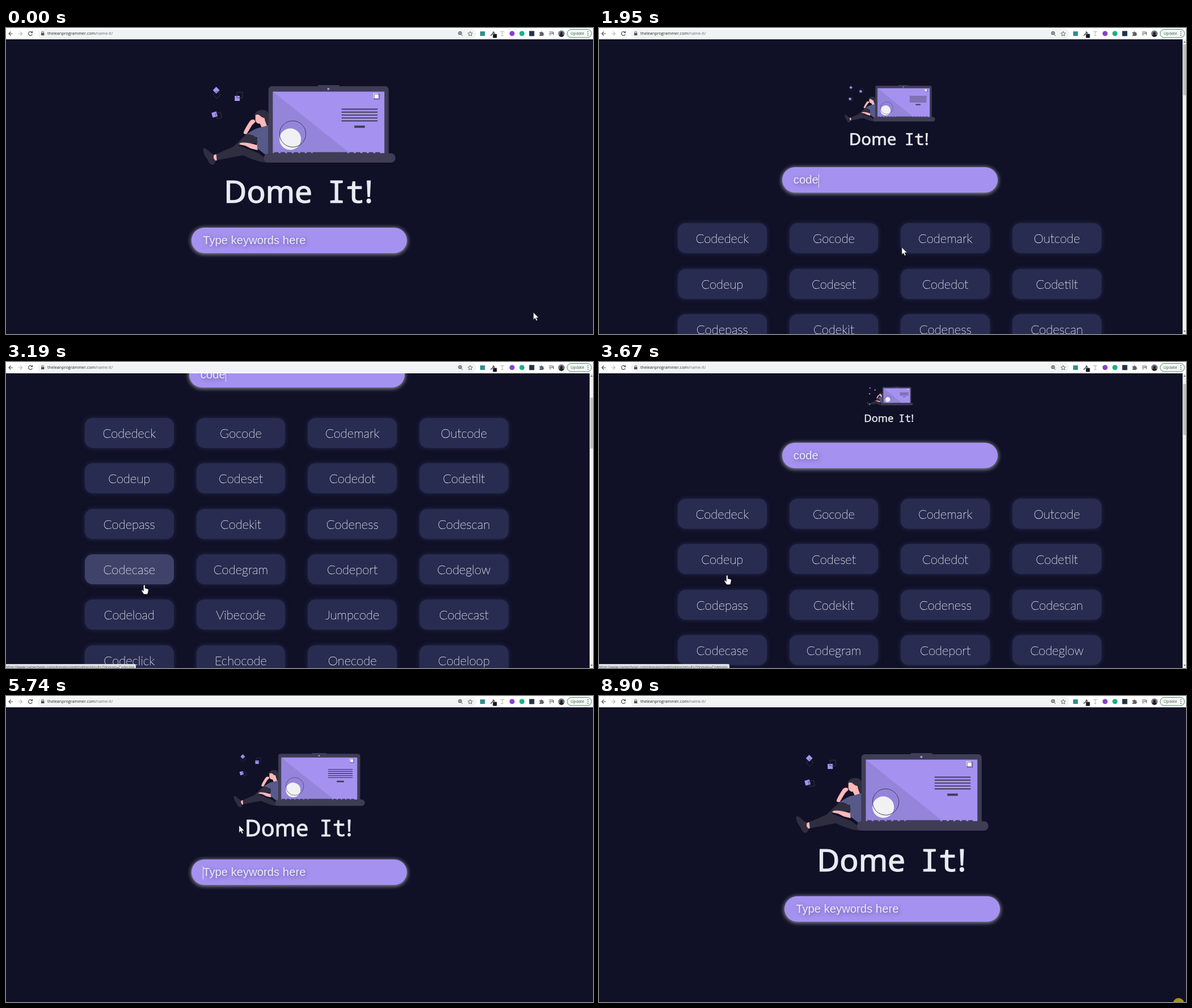
Recreate the animation shown at these times as an HTML page. Size 1035x541 px, loop 9070 ms.

```html
<!DOCTYPE html>
<html lang="en">
<head>
<meta charset="utf-8">
<title>Dome It!</title>
<style>
html, body { margin: 0; width: 100%; height: 100%; overflow: hidden; background: #101127; }
#stage { position: relative; width: 1035px; height: 541px; overflow: hidden; }
#stage > *, #page > * { position: absolute; }
#view { inset: 0; clip-path: inset(20px 0 0 0); }
#page, svg { position: absolute; left: 0; top: 0; width: 1035px; height: 541px; overflow: visible; }
#input {
  width: 360px; height: 45px; padding-left: 20px; border-radius: 23px; background: #a592f0;
  box-shadow: 0 1px 7px 1px rgba(255,255,255,.55);
  font: 20.25px/45px "Liberation Sans", Arial, sans-serif; color: #ecebf5;
  text-shadow: 2px 2px 6px rgba(40,30,90,.5); white-space: pre;
}
#input i { display: inline-block; width: 1px; height: 23px; margin-right: -1px; vertical-align: middle; background: #eee; }
#typed.sel { background: #3390ff; color: #fff; }
.card {
  width: 156.5px; border-radius: 14px; text-align: center; color: #eceef6;
  background: #282c50; box-shadow: 0 0 9px rgba(62,66,112,.5);
}
.card.thin { -webkit-text-stroke: .4px #eceef6; }
.card.hot { background: #3f4369; }
#bar { left: 1028.6px; top: 20px; width: 7px; height: 521px; background: #f1f1f1; }
#thumb { position: absolute; left: 1px; width: 5px; height: 90px; background: #c1c1c1; }
#status {
  left: 0; top: 534px; height: 9px; padding-right: 3px; background: #dee1e6; color: #4a4d52;
  border-radius: 0 2px 0 0; font: 6.2px/11px "Open Sans", sans-serif; white-space: pre; text-indent: -1px;
}
</style>
</head>
<body>
<div id="stage">
  <div id="view">
    <div id="page">
      <svg>
        <g id="art">
          <!-- floating squares -->
          <g fill="#a592f0">
            <path d="M371 104l6 6-6 6-6-6z"/>
            <path d="M403.5 120h9v9h-9z"/>
            <path d="M362.5 150l8.600-2.400 2.400 8.600-8.600 2.400z"/>
          </g>
          <path d="M372 111.500l6.500 6.500-6.500 6.500-6.500-6.500zM407.500 113.500h10v10h-10zM369.500 151.500l9-2.500 2.500 9-9 2.500z" fill="none" stroke="#3f3d56" stroke-width=".8"/>
          <!-- person -->
          <path d="M438 153q6-10 17-8 6 1 8 6v24h-6l-4-14z" fill="#2f2e41"/>
          <path d="M440 154q4-2 7 0 5 5 9 5l1 5 4 11-9 3-4-9q-6 1-8-6z" fill="#ffb8b8"/>
          <path d="M463 172l-15 4q-6 1-11 4l-13 8 2 4 17 1-1 19 21 16z" fill="#575a89"/>
          <path d="M419 185q3-8 11-20 4-5 9-2l1 3-6 6-9 15q-5 2-6-2z" fill="#ffb8b8"/>
          <path d="M371 223l30-13 23-22q9-2 19 7l1 9-31 0-2 4 34 13 19 14-5 3q-15-1-41-13l-47 9z" fill="#2f2e41"/>
          <path d="M412 204q6-4 31 3l1 9-12-3-10-5-10-2z" fill="#ffb8b8"/>
          <path d="M371 223l1 11-4 1-3-10z" fill="#ffb8b8"/>
          <path d="M348 213q3-2 8 3 5 5 11 8l-1 6 4 5q-1 5-5 7-6 0-9-9-9-11-8-20z" fill="#2f2e41"/>
          <!-- laptop -->
          <g fill="#3f3d56">
            <rect x="550" y="101" width="38" height="6" rx="1"/>
            <rect x="463" y="103" width="212" height="130" rx="6"/>
          </g>
          <circle cx="568.700" cy="107.700" r="2" fill="#a592f0"/>
          <path d="M471 112.500h196.500v109H471z" fill="#a592f0"/>
          <path d="M471 112.500l136 109H471z" fill="#9485db"/>
          <circle cx="501.500" cy="196.500" r="19" fill="#f1f1f3"/>
          <circle cx="505.800" cy="187.300" r="23.200" fill="none" stroke="#3f3d56"/>
          <path d="M648 115.500h8.500v8.500H648z" fill="#fff"/>
          <path d="M649.500 117h9.500v9h-9.500z" fill="none" stroke="#3f3d56" stroke-width=".8"/>
          <path d="M592 143.500h63.500m-63.500 5.200h63.500m-63.500 5.200h63.500m-63.500 5.200h63.500m-63.500 5.200h63.500" stroke="#3f3d56" stroke-width="1.900"/>
          <path d="M614.500 172.500H633v4h-18.500zM541 219.500h53v4h-53z" fill="#3f3d56"/>
          <path d="M473 221h68M594 221h68" stroke="#3f3d56" stroke-width="3" stroke-dasharray="8 3.500"/>
          <rect x="455" y="221.500" width="232" height="16.500" rx="8" fill="#3f3d56"/>
        </g>
        <text id="title" text-anchor="middle" font-family="Noto Sans, sans-serif" font-size="55" word-spacing="12" fill="#e8ebf1" stroke="#e8ebf1" stroke-width="1.200" stroke-linejoin="round">Dome <tspan font-family="Noto Sans Mono, monospace">It</tspan>!</text>
      </svg>
      <div id="input"><span id="typed"></span><i id="caret"></i><span id="hint">Type keywords here</span></div>
    </div>
  </div>
  <div id="bar"><div id="thumb"></div>
    <svg style="width:7px;height:521px" fill="#777"><path d="M1.500 6l2-3 2 3zM1.500 515l2 3 2-3z"/></svg>
  </div>
  <div id="status"></div>
  <svg id="chrome" font-family="Open Sans, sans-serif">
    <path d="M0 0h1035v20H0z" fill="#fff"/>
    <rect x="56" y="2" width="773" height="16" rx="8" fill="#f1f3f4"/>
    <g fill="none" stroke="#50545a" stroke-width="1.200">
      <path d="M12 10H5m3.500-3.500L5 10l3.500 3.500"/>
      <path d="M21.500 10h7M25 6.500l3.500 3.500-3.500 3.500" stroke="#b8babd"/>
      <path d="M46 8a3.500 3.500 0 1 0 .3 3M46.500 5.500v3h-3"/>
      <path d="M63 9V7.800a1.700 1.700 0 0 1 3.400 0V9" stroke-width=".9"/>
      <circle cx="800.500" cy="9" r="2.700"/><path d="M802.500 11l2.500 3M799 9h3M800.500 7.500v3" stroke-width=".9"/>
      <path d="M818.500 6l1.200 2.700 2.800.3-2.100 2 .6 2.800-2.500-1.400-2.500 1.400.6-2.800-2.100-2 2.800-.3z" stroke-width=".9"/>
      <path d="M854.500 13.500l5-5" stroke-width="1.700"/><path d="M858.500 6.500l3 3" stroke-width="2"/>
      <path d="M871.500 6.500h7m-3.500 0v7m-2 0h4" stroke="#aaa" stroke-width=".9"/>
      <path d="M957.500 7h7m-7 2.500h7m-7 2.500h4m3.500-5v5.500"/>
    </g>
    <rect x="62" y="8.800" width="5.400" height="4.200" rx=".6" fill="#50545a"/>
    <text x="73" y="12.300" font-size="7.200" fill="#25272b">theleanprogrammer.com<tspan fill="#6a6e73">/name-it/</tspan></text>
    <rect x="836" y="6" width="8.500" height="8" fill="#2f8f8d"/>
    <rect x="858.500" y="10.500" width="7" height="7" rx="1" fill="#17181f"/>
    <circle cx="892.300" cy="9.700" r="4.500" fill="#8a3fd1"/>
    <circle cx="909.700" cy="9.700" r="4.500" fill="#18b08a"/>
    <rect x="922.500" y="5.300" width="9" height="9" fill="#1f3347"/>
    <path d="M940.500 7.500h2.300a1.300 1.300 0 0 1 2.600 0h2v2.300a1.300 1.300 0 0 1 0 2.600v1.600h-6.900v-2a1.200 1.200 0 0 0 0-2.400z" fill="#5f6368"/>
    <circle cx="979.300" cy="10" r="5.700" fill="#6f747e"/>
    <path d="M975 13.700q1-2.200 2.800-2.500a2.300 2.300 0 1 1 3 0q1.800.3 2.800 2.500a5.700 5.700 0 0 1-8.600 0z" fill="#1f2129"/>
    <rect x="989.500" y="2.500" width="43" height="14.500" rx="7.200" fill="#f3f8f4" stroke="#3d7a57" stroke-width=".9"/>
    <text x="995.500" y="12.300" font-size="7" fill="#3d5a4a">Update</text>
    <path d="M1026 6.500h.01m-.01 3.300h.01m-.01 3.300h.01" stroke="#333" stroke-width="1.600" stroke-linecap="round"/>
  </svg>
  <svg id="pointer">
    <path id="arrow" d="M0 0v12.500l2.900-2.700 2.100 4.700 2-.9-2-4.500h4z" fill="#fff" stroke="#222" stroke-width=".5"/>
    <path id="beam" d="M-3.500-6.500h2.500l1 1 1-1h2.500M-3.500 6.500H-1l1-1 1 1h2.500M0-5.500v11M-1.500 2.500h3" fill="none" stroke="#5f6230"/>
    <path id="hand" d="M-1.500 1q1.300-2 2.600 0v5l5 1.200q1.200.4 1 2l-1 5.300-1 2h-6l-4-6q-.2-1.600 1.600-1l1.800 1.600z" fill="#fff" stroke="#222" stroke-width=".5"/>
    <circle id="halo" r="10" fill="#ffe600" opacity=".62"/>
  </svg>
</div>
<script>
const $ = id => document.getElementById(id);
const LOOP = 9070, OPEN = 1540, CLOSE = 5405;
const WORDS = `Codedeck Gocode Codemark Outcode Codeup Codeset Codedot Codetilt
  Codepass Codekit Codeness Codescan Codecase Codegram Codeport Codeglow
  Codeload Vibecode Jumpcode Codecast Codeclick Echocode Onecode Codeloop`.split(/\s+/);
const FIRST = ['Cspark', 'Corec', 'Cside', 'Coc'];
const KEYS = [1540, 1610, 1690, 1760];
const BLINKS = [760, 1310, 1540, 2290, 2820, 3350, 3880, 4410, 5430, 5960, 6510, 7060, 7520, 8050, 8600, 8900];
const CLICKS = [[760, 930], [4800, 4970], [8900, LOOP]];
// time, hovered word, highlighted
const HOVERS = [[0, ''], [2100, 'Codedot'], [2650, 'Codekit', 1], [2900, 'Codecase', 1],
  [3450, 'Codecase'], [3600, 'Codepass'], [3850, 'Codeup', 1], [4550, '']];
const PATH = [[70, 930, 503], [530, 534, 388], [2480, 534, 388], [3100, 244, 394], [3420, 244, 394],
  [3670, 226, 377], [4270, 226, 384], [4800, 411, 229], [7670, 411, 229], [7920, 343, 310],
  [8520, 1002, 516], [8750, 1022, 544]];
const SCROLL = [[2480, 0], [3080, 200], [3420, 200], [3808, 0]];

const clamp = v => Math.min(1, Math.max(0, v));
const mix = (a, b, k) => a + (b - a) * k;
const count = (list, t) => list.filter(v => v <= t).length;
const show = (id, on) => $(id).style.display = on ? '' : 'none';

// cubic-bezier(.25, .1, .25, 1)
function ease(x) {
  let lo = 0, hi = 1, s;
  for (let i = 0; i < 20; i++) {
    s = (lo + hi) / 2;
    if (.75 * s * (1 - s) + s ** 3 < x) lo = s; else hi = s;
  }
  return .3 * s * (1 - s) ** 2 + 3 * s * s * (1 - s) + s ** 3;
}

function track(keys, t) {
  const i = keys.findIndex(k => k[0] > t);
  if (i === 0) return keys[0].slice(1);
  if (i < 0) return keys[keys.length - 1].slice(1);
  const a = keys[i - 1], b = keys[i];
  const u = (t - a[0]) / (b[0] - a[0]), k = u * u * (3 - 2 * u);
  return a.slice(1).map((v, j) => mix(v, b[j + 1], k));
}

const cards = WORDS.map(() => {
  const card = document.createElement('div');
  return $('page').appendChild(card);
});

function layoutCards(t, top, typed, hover, hot) {
  const loaded = t > 1900;
  const height = loaded ? 53 : 51, pitch = loaded ? 80.3 : 78.3;
  const font = loaded ? '100 22px/53px Lato, sans-serif' : '22px/51px "Liberation Sans", Arial, sans-serif';
  cards.forEach((card, i) => {
    let word = WORDS[i].replace(/code/i, m => m[0] + typed.slice(1));
    if (typed.length === 1 && i < 4) word = FIRST[i];
    card.textContent = word;
    card.className = 'card' + (loaded ? ' thin' : '') + (hot && word === hover ? ' hot' : '');
    Object.assign(card.style, {
      left: 139 + i % 4 * 196.7 + 'px', top: top + Math.floor(i / 4) * pitch + 'px',
      height: height + 'px', font
    });
  });
}

function draw(t) {
  const open = t >= OPEN && t < CLOSE;
  const size = t < CLOSE ? 1 - ease(clamp((t - OPEN) / 1000)) : ease(clamp((t - CLOSE) / 1000));
  const mid = open ? 512.8 : 517.2;
  const [scroll] = track(SCROLL, t), [x, y] = track(PATH, t);
  const typed = open ? 'code'.slice(0, count(KEYS, t)) : '';
  const [, hover, hot] = HOVERS[count(HOVERS.map(h => h[0]), t) - 1];
  const top = mix(200, 353.5, size);

  $('page').style.transform = `translateY(${-scroll}px)`;
  $('art').setAttribute('transform', `translate(${mid} 101) scale(${mix(81, 339, size) / 339}) translate(-517.5 -101)`);
  $('title').setAttribute('transform', `translate(${mid - 1.5} ${mix(163, 309.5, size)}) scale(${mix(.335, 1, size)})`);
  $('input').style.left = mid - 190 + 'px';
  $('input').style.top = top + 'px';
  $('typed').textContent = typed;
  $('typed').className = t > 4970 ? 'sel' : '';
  show('hint', !typed);
  $('caret').style.visibility = count(BLINKS, t) % 2 ? 'visible' : 'hidden';

  cards.forEach(card => card.style.display = open ? '' : 'none');
  if (open) layoutCards(t, top + 99, typed, hover, hot);
  show('bar', open);
  $('thumb').style.top = 9 + scroll * .17 + 'px';
  show('status', hover);
  $('status').textContent = 'https://www.namecheap.com/domains/registration/results/?domain=' + hover;

  const inInput = Math.abs(x - mid) < 190 && y > top - scroll && y < top - scroll + 45;
  const kind = hover ? 'hand' : inInput ? 'beam' : 'arrow';
  for (const k of ['hand', 'beam', 'arrow']) show(k, k === kind);
  show('halo', CLICKS.some(([a, b]) => t >= a && t < b));
  $('pointer').style.transform = `translate(${x}px, ${y}px)`;
}

const start = performance.now();
function frame() {
  draw((performance.now() - start) % LOOP);
  requestAnimationFrame(frame);
}
frame();
</script>
</body>
</html>
```
